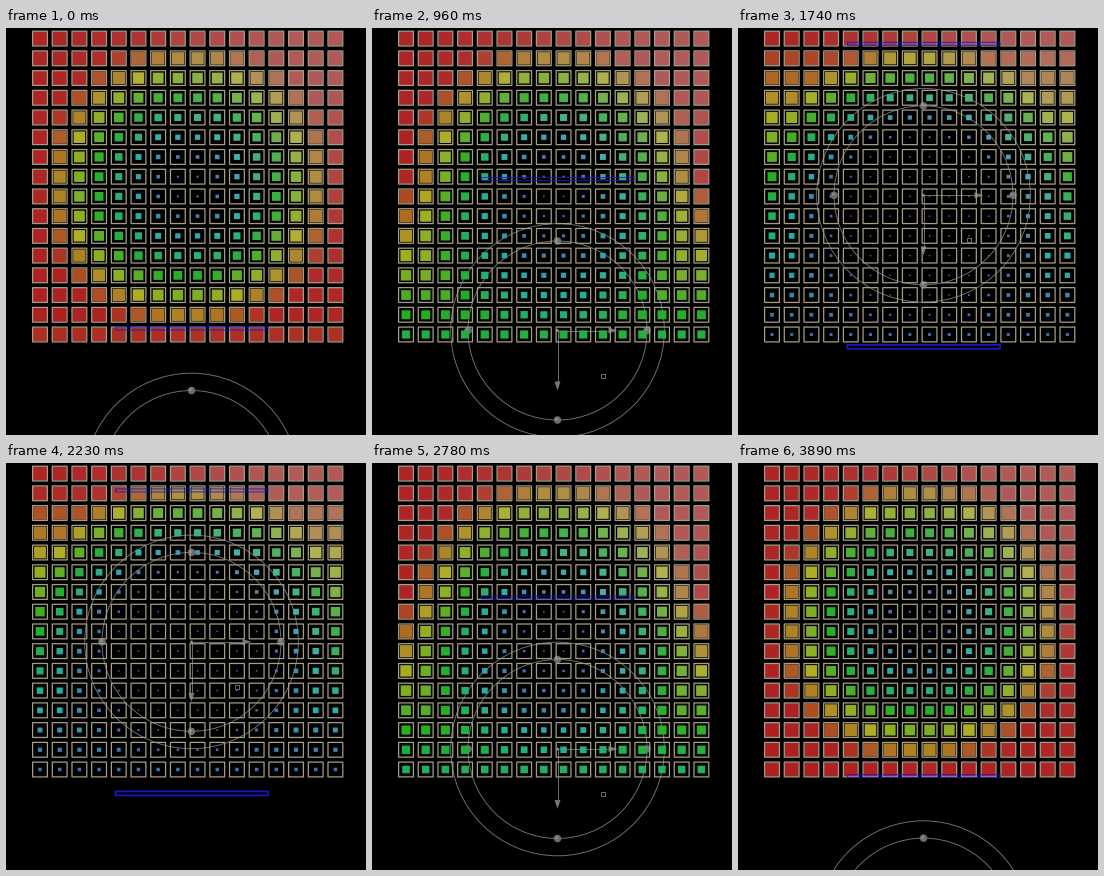
Animation of 360x407 px, one loop 3.96 s. Source, as a matplotlib script:

```python
import numpy as np
import matplotlib.pyplot as plt
from matplotlib.animation import FuncAnimation
from matplotlib.collections import LineCollection, PolyCollection
from matplotlib.colors import hsv_to_rgb
from matplotlib.patches import Circle, Polygon, Rectangle

W, H, DPI = 360, 407, 100
LOOP, STEP = 3960, 20
PX = 72 / DPI
N = 16
CX = 185.5            # horizontal centre of the gizmo
REACH = 151.5         # distance from its centre to each blue bar
R_IN, R_OUT = 89.5, 106.8
GREY = (.46, .46, .46)
BLUE = (.09, .09, .8)

# Hand-dragged height of the gizmo at a few key times (s)
KEY_T = np.array([0, .6, 1.32, 1.92, 2.23, 2.78, 3.19, 3.89])
KEY_Y = np.array([452, 382, 224, 160, 180, 286, 370, 466])
KEY_V = np.gradient(KEY_Y, KEY_T)


def centre(t):
    """Smooth curve through the key heights."""
    t = min(t, KEY_T[-1])
    k = min(np.searchsorted(KEY_T, t, side="right") - 1, len(KEY_T) - 2)
    h = KEY_T[k + 1] - KEY_T[k]
    s = (t - KEY_T[k]) / h
    ease = s * s * (3 - 2 * s)
    return (KEY_Y[k] + (KEY_Y[k + 1] - KEY_Y[k]) * ease
            + h * s * (1 - s) * (KEY_V[k] * (1 - s) - KEY_V[k + 1] * s))


def squares(half):
    """Corner points of one square per cell."""
    half = np.broadcast_to(half, gx.shape)[:, None]
    sx, sy = np.array([-1, 1, 1, -1]), np.array([-1, -1, 1, 1])
    return np.stack([gx[:, None] + half * sx, gy[:, None] + half * sy], axis=2)


def colours(level):
    """Violet to red with level, veiled by a soft grey sheen."""
    hue = np.interp(level, [0, .4, .6, .8, 1], [.7, .48, .34, .165, 0])
    sat = np.minimum(.45 + level, .81)
    rgb = hsv_to_rgb(np.stack([hue, sat, np.full(N * N, .68)], axis=1))
    return rgb + (.72 - rgb) * sheen


xs = np.linspace(34.0, 329.4, N)
ys = np.linspace(10.6, 306.5, N)
gx, gy = (a.ravel() for a in np.meshgrid(xs, ys))
radial = np.minimum(np.hypot(gx - xs.mean(), gy - ys.mean()) / 149, 1)
sheen = .38 * np.exp(-((gx - 300)**2 + (gy - 30)**2) / 165**2)[:, None]

fig = plt.figure(figsize=(W / DPI, H / DPI), dpi=DPI, facecolor="black")
ax = fig.add_axes([0, 0, 1, 1])
ax.set_xlim(0, W)
ax.set_ylim(H, 0)
ax.axis("off")

fills = PolyCollection(squares(1), linewidths=0, zorder=2)
frames = PolyCollection(squares(7.4), facecolors="none",
                        edgecolors=(.64, .62, .53), linewidths=1.25 * PX,
                        zorder=3)
for cells in (fills, frames):
    cells.set_snap(False)
    ax.add_collection(cells)


def bar(h, lw, alpha):
    return ax.add_patch(Rectangle((109.5, 0), 152.5, h, fill=False, ec=BLUE,
                                  lw=lw * PX, alpha=alpha, snap=False,
                                  zorder=4))


def disc(r, grey):
    return ax.add_patch(Circle((CX, 0), r, fc=(grey,) * 3, ec="none",
                               zorder=1.2))


top_bar, low_bar = bar(3, 1, .85), bar(4, 1.7, 1)
rings = [ax.add_patch(Circle((CX, 0), r, fill=False, ec=GREY, lw=.9 * PX,
                             zorder=1)) for r in (R_IN, R_OUT)]
knob_at = R_IN * np.array([(-1, 0), (1, 0), (0, -1), (0, 1)])
knobs = [disc(3.8, .42) for _ in knob_at]
glints = [disc(1.5, .54) for _ in knob_at]
dot = disc(1.4, .55)
arms = LineCollection([], colors=[GREY], linewidths=.9 * PX, zorder=1)
ax.add_collection(arms)
head = np.array([(60, 0), (51, -3), (51, 3)])
heads = [ax.add_patch(Polygon(head, fc=GREY, ec="none", zorder=1))
         for _ in range(2)]
handle = ax.add_patch(Rectangle((0, 0), 4, 4, fill=False, ec=GREY,
                                lw=.9 * PX, zorder=1))


def draw(i):
    c = centre(i * STEP / 1000)

    ramp = np.clip((c + REACH - gy) / (2 * REACH), 0, 1)
    level = np.clip(radial + .87 * (ramp - 1), .05, 1)
    fills.set_verts(squares(.4 + 6.7 * level))
    fills.set_facecolor(colours(level))

    top_bar.set_y(c - REACH - 1.5)
    low_bar.set_y(c + REACH - 2)
    for ring in rings:
        ring.center = (CX, c)
    for knob, glint, (dx, dy) in zip(knobs, glints, knob_at):
        knob.center = (CX + dx, c + dy)
        glint.center = (CX + dx - .8, c + dy - .8)
    arms.set_segments([[(CX, c), (CX + 55, c)], [(CX, c), (CX, c + 55)]])
    heads[0].set_xy(head + (CX, c))
    heads[1].set_xy(head[:, ::-1] + (CX, c))
    dot.center = (CX, c)
    handle.set_xy((228.5, c + 43))


anim = FuncAnimation(fig, draw, frames=LOOP // STEP, interval=STEP,
                     init_func=lambda: draw(0), repeat=True, repeat_delay=0)
plt.show()
```
